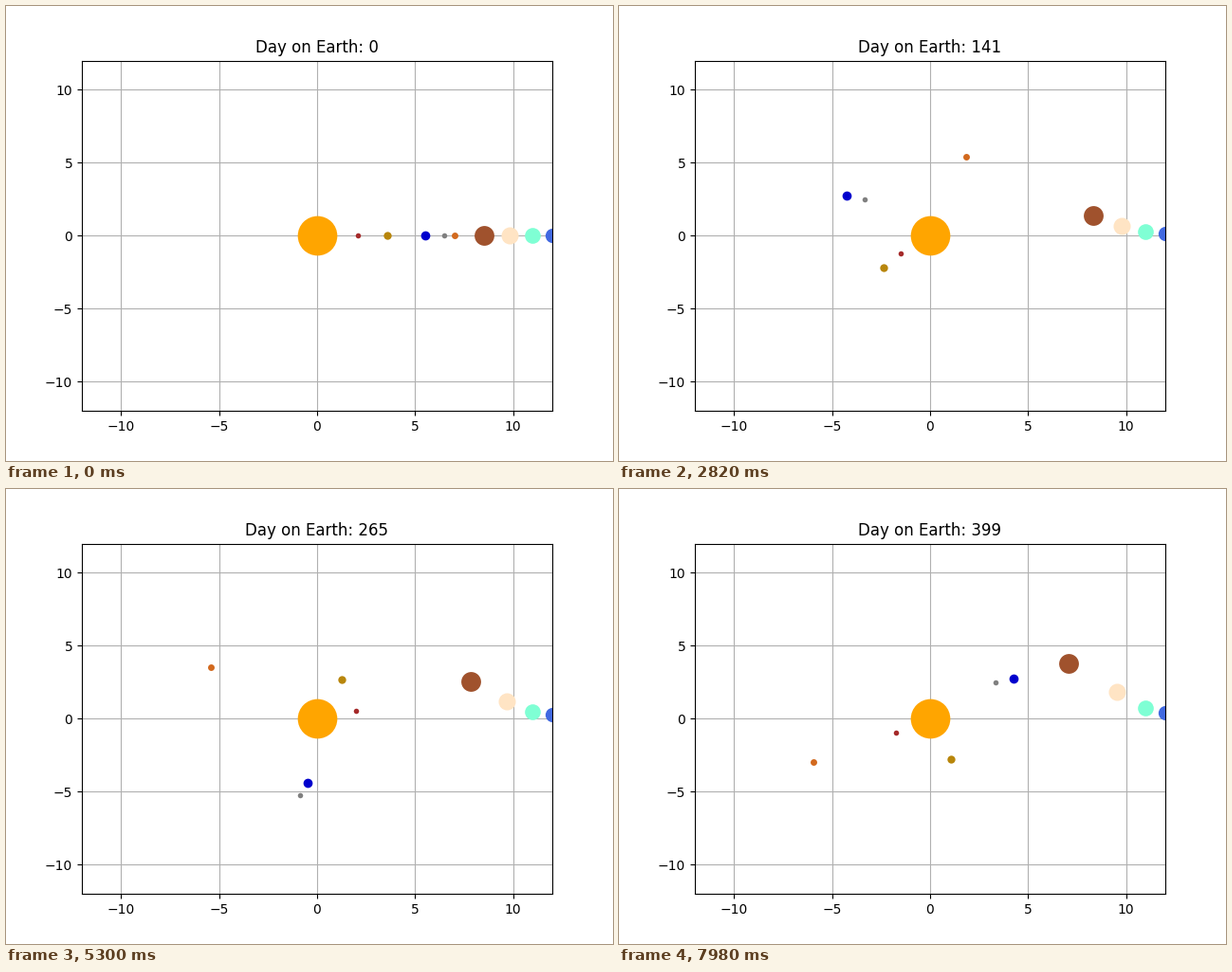
A matplotlib script for the animation above (8 s loop, 640 by 480 pixels).

```python
import numpy as np
import matplotlib.pyplot as plt
from matplotlib.animation import FuncAnimation

DAYS = 400
YEAR = 365
SQUASH = 0.8  # height of each orbit relative to its width

# orbit radius, period in days, marker size, colour
PLANETS = {
    "mercury": (2.1, 88, 4, "brown"),
    "venus": (3.6, 225, 6, "darkgoldenrod"),
    "earth": (5.5, YEAR, 7, "mediumblue"),
    "mars": (7.0, 687, 5, "chocolate"),
    "jupiter": (8.5, 4331, 15, "sienna"),
    "saturn": (9.8, 10759, 13, "bisque"),
    "uranus": (11.0, 30687, 12, "aquamarine"),
    "neptune": (12.0, 60190, 11, "royalblue"),
}
MOON_RADIUS = 0.965
MOON_PERIOD = 73

fig, ax = plt.subplots(figsize=(6.4, 4.8), dpi=100)
ax.set(xlim=(-12, 12), ylim=(-12, 12))
ax.grid(True)
title = ax.set_title("Day on Earth: 0")


def ball(x, size, color):
    return ax.plot([x], [0], "o", ms=size, color=color, mew=0)[0]


def orbit(day, radius, period, squash=SQUASH):
    # the simulated year has 360 steps of one degree
    angle = np.radians(day * YEAR / period)
    return radius * np.cos(angle), squash * radius * np.sin(angle)


ball(0, 30, "orange")
balls = {name: ball(r, size, color)
         for name, (r, _, size, color) in PLANETS.items()}
moon = ball(PLANETS["earth"][0] + MOON_RADIUS, 4, "gray")


def update(day):
    for name, (radius, period, _, _) in PLANETS.items():
        x, y = orbit(day, radius, period)
        balls[name].set_data([x], [y])
        if name == "earth":
            dx, dy = orbit(day, MOON_RADIUS, MOON_PERIOD, squash=1)
            moon.set_data([x + dx], [y + dy])
    title.set_text(f"Day on Earth: {day}")
    return [*balls.values(), moon, title]


anim = FuncAnimation(fig, update, frames=DAYS, interval=20,
                     repeat=True, repeat_delay=0, blit=False)
plt.show()
```
